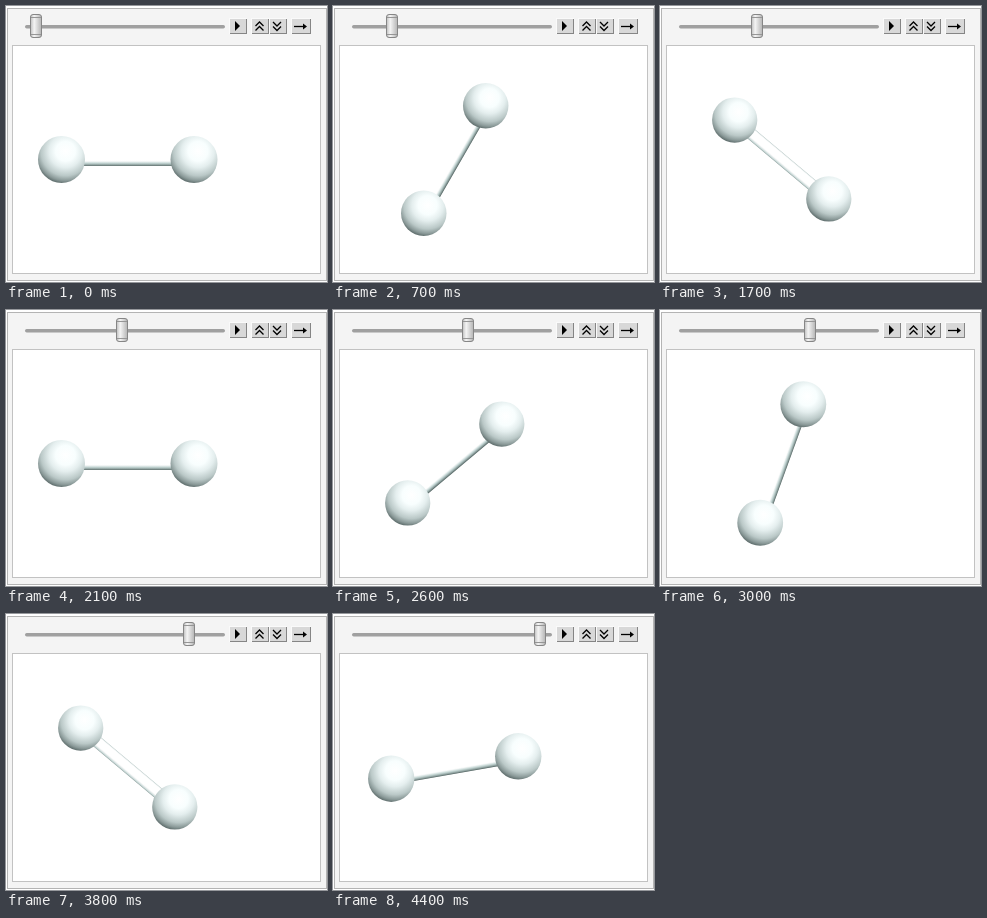
An HTML page with a canvas that plays this animation: 321 by 276 pixels, repeating every 4500 ms.

```html
<!DOCTYPE html>
<html lang="en">
<head>
<meta charset="utf-8">
<title>Rotating dumbbell</title>
<style>
  html, body { margin: 0; width: 100%; height: 100%; overflow: hidden; background: #fff; }
  canvas { display: block; }
</style>
</head>
<body>
<canvas id="stage" width="321" height="276"></canvas>
<script>
const ctx = document.getElementById('stage').getContext('2d');
const CX = 121.75, CY = 153.5;
const LOOP = 4500, TICK = 100;
const HOLDS = [4, 10, 16, 22, 29, 35, 41]; // ticks on which the pose is held

function box(x, y, w, h, fill) {
  ctx.fillStyle = fill;
  ctx.fillRect(x, y, w, h);
}

function frame(x, y, w, h, fill, edge) {
  box(x, y, w, h, edge);
  box(x + 1, y + 1, w - 2, h - 2, fill);
}

function line(points, width = 1.3) {
  ctx.beginPath();
  points.forEach(([x, y]) => ctx.lineTo(x, y));
  ctx.strokeStyle = '#000';
  ctx.lineWidth = width;
  ctx.stroke();
}

function triangle(x, y, w, h) {
  ctx.beginPath();
  ctx.moveTo(x, y - h);
  ctx.lineTo(x + w, y);
  ctx.lineTo(x, y + h);
  ctx.fillStyle = '#000';
  ctx.fill();
}

function button(x, w) {
  box(x, 12, w, 16, '#fafafa');
  box(x + 1, 13, w - 1, 15, '#858585');
  box(x + 1, 13, w - 2, 14, '#d8d8d8');
}

function chevrons(x, dir) {
  for (const y of [18, 22.5]) {
    line([[x - 4, y + 2 * dir], [x, y - 2 * dir], [x + 4, y + 2 * dir]]);
  }
}

function drawPanel() {
  box(0, 0, 321, 276, '#fff');
  frame(1, 2, 320, 273, '#f4f4f4', '#b4b4b4');
  frame(6, 39, 309, 229, '#fff', '#c2c2c2');

  ctx.beginPath();
  ctx.roundRect(19, 19, 200, 3.5, 1.7);
  ctx.fillStyle = '#a0a0a0';
  ctx.fill();

  button(223, 18);
  button(245, 18);
  button(263, 18);
  button(285, 20);
  triangle(229, 20, 5, 5);
  chevrons(253.5, 1);
  chevrons(271, -1);
  line([[288, 20.5], [298, 20.5]]);
  triangle(297, 20.5, 4, 3);
}

function drawThumb(x) {
  const g = ctx.createLinearGradient(x - 6, 0, x + 6, 0);
  g.addColorStop(0, '#b8b8b8');
  g.addColorStop(0.35, '#f4f4f4');
  g.addColorStop(1, '#b0b0b0');
  ctx.beginPath();
  ctx.roundRect(x - 5.5, 8.5, 11, 23, 2.5);
  ctx.fillStyle = g;
  ctx.fill();
  ctx.strokeStyle = '#868686';
  ctx.lineWidth = 1;
  ctx.stroke();
  box(x - 5, 11, 10, 1, '#969696');
  box(x - 5, 28, 10, 1, '#969696');
}

// Colour of a surface facing the light by amount v (-1 to 1)
function shade(v) {
  const d = Math.min(1, Math.max(0, (0.78 - v) / 1.56));
  const c = 255 - 185 * d ** 0.85;
  const tint = 18 * Math.min(1, d * 4);
  return `rgb(${c}, ${Math.min(255, c + tint)}, ${Math.min(255, c + tint * 0.9)})`;
}

function drawRod(angle, half, length) {
  const facing = 0.62 * Math.sin(angle) + 0.78 * Math.cos(angle);
  const g = ctx.createLinearGradient(0, -half, 0, half);
  for (let i = 0; i <= 16; i++) {
    const u = i / 8 - 1;
    g.addColorStop(i / 16, shade(Math.sqrt(1 - u * u) - u * facing));
  }
  ctx.save();
  ctx.translate(CX, CY);
  ctx.rotate(-angle);
  box(-length / 2, -half, length, 2 * half, g);
  ctx.restore();
}

function drawBall(x, y, r) {
  const hx = x + 0.17 * r, hy = y - 0.35 * r;
  const g = ctx.createRadialGradient(hx, hy, 0, hx, hy, 1.39 * r);
  g.addColorStop(0, '#ffffff');
  g.addColorStop(0.3, '#f8fefe');
  g.addColorStop(0.5, '#e4eeee');
  g.addColorStop(0.75, '#bac8c7');
  g.addColorStop(0.9, '#8a9998');
  g.addColorStop(1, '#5c6b6a');
  ctx.beginPath();
  ctx.arc(x, y, r, 0, 2 * Math.PI);
  ctx.fillStyle = g;
  ctx.fill();
}

function draw(now) {
  const tick = Math.floor((now % LOOP) / TICK);
  const step = tick - HOLDS.filter(h => h <= tick).length;
  // Poses repeat every half turn
  const angle = (step * 10 % 180) * Math.PI / 180;
  const scale = 1 / (1 + 0.08 * Math.abs(Math.sin(2 * angle)));
  const reach = 66.25 * scale, r = 23.5 * Math.sqrt(scale);
  const dx = reach * Math.cos(angle), dy = reach * Math.sin(angle);

  drawPanel();
  drawThumb(Math.round(30 + step * 4.784));
  drawRod(angle, 6.4 * scale, 2 * reach);
  drawBall(CX - dx, CY + dy, r);
  drawBall(CX + dx, CY - dy, r);
}

const start = performance.now();
function loop() {
  draw(performance.now() - start);
  requestAnimationFrame(loop);
}
loop();
</script>
</body>
</html>
```
